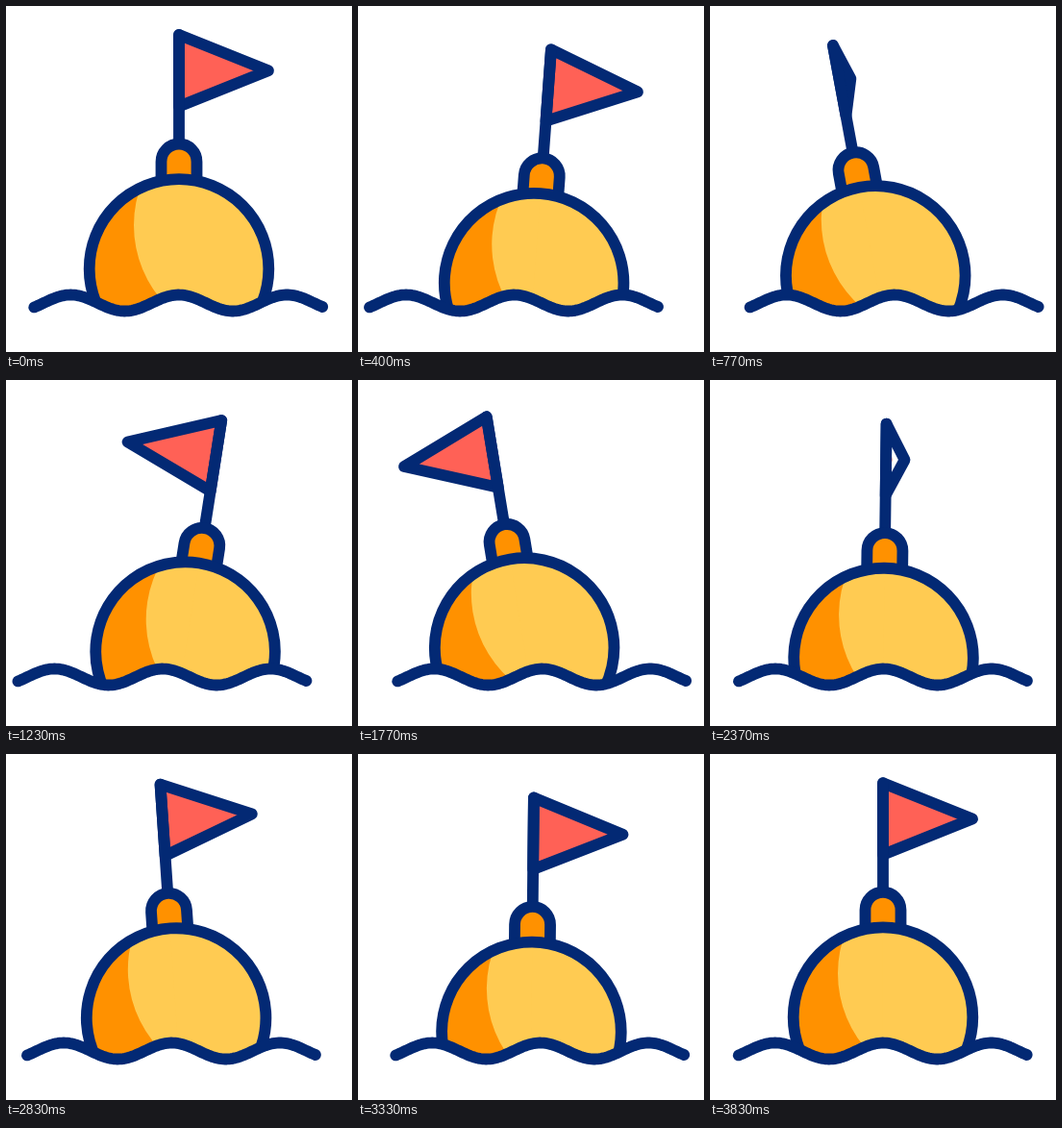
Animation, 360 px wide and 360 px high, one loop 3870 ms. Source, as an HTML page:

```html
<!DOCTYPE html>
<html lang="en">
<head>
<meta charset="utf-8">
<title>Buoy</title>
<style>
  html, body { margin: 0; width: 100%; height: 100%; overflow: hidden; background: #fff; }
  svg { display: block; width: 100vw; height: 100vh; }
  .line { stroke: #032974; stroke-width: 11.8; stroke-linecap: round; stroke-linejoin: round; }
</style>
</head>
<body>
<svg viewBox="0 0 360 360">
  <defs>
    <clipPath id="aboveWater"><path id="air"/></clipPath>
    <clipPath id="ball"><circle cx="180" cy="273.5" r="93.3"/></clipPath>
  </defs>
  <g clip-path="url(#aboveWater)">
    <g id="buoy">
      <path id="cloth" fill="#ff6156"/>
      <path id="flag" class="line" fill="none"/>
      <path class="line" fill="none" d="M180 30V143"/>
      <path class="line" fill="#ff9100" d="M161.5 184V162a18.5 18.5 0 0 1 37 0V184"/>
      <g clip-path="url(#ball)">
        <rect x="80" y="170" width="200" height="200" fill="#ff9100"/>
        <circle cx="253" cy="228" r="120" fill="#ffcb52"/>
        <rect x="180" y="170" width="100" height="200" fill="#ffcb52"/>
      </g>
      <circle class="line" cx="180" cy="273.5" r="93.3" fill="none"/>
    </g>
  </g>
  <path id="wave" class="line" fill="none"/>
</svg>
<script>
const LOOP = 3870;
const SWING = 958;   // one rock of the buoy
const BOB = 964;     // one dip of the buoy
const BOB_DELAY = 14;
const DRIFT = 433.3; // one sweep of the water
const [air, buoy, cloth, flag, wave] =
  ["air", "buoy", "cloth", "flag", "wave"].map(id => document.getElementById(id));

// cubic-bezier(.4, 0, .6, 1), solved by bisection
function ease(p) {
  let low = 0, high = 1, s = 0.5;
  for (let i = 0; i < 18; i++) {
    s = (low + high) / 2;
    const x = 1.2 * (1 - s) ** 2 * s + 1.8 * (1 - s) * s * s + s ** 3;
    if (x < p) low = s; else high = s;
  }
  return s * s * (3 - 2 * s);
}

function keyed(t, keys) {
  const next = keys.findIndex(([time]) => time > t);
  if (next < 0) return keys[keys.length - 1][1];
  if (next === 0) return keys[0][1];
  const [t0, v0] = keys[next - 1], [t1, v1] = keys[next];
  return v0 + (v1 - v0) * ease((t - t0) / (t1 - t0));
}

const driftKeys = [[-33, 0]];
const tiltKeys = [[0, 0]];
for (let i = 0; i < 8; i++) {
  driftKeys.push([(i + 1) * DRIFT - 33, i % 2 ? 13.5 : -17.5]);
  tiltKeys.push([(i + 0.5) * SWING / 2, i % 2 ? -11 : 9.1]);
}
driftKeys.push([LOOP, 0]);
tiltKeys.push([4 * SWING, 0]);
const flipKeys = [[494, 1], [1094, -1], [2033, -1], [2633, 1]];

function waterLine(from, to, shift) {
  const points = [];
  for (let x = from; x <= to; x += 2) {
    const y = 309 - 8.5 * Math.cos((x - 180) / 112.5 * 2 * Math.PI);
    points.push((x + shift).toFixed(2) + " " + y.toFixed(2));
  }
  return "M" + points.join("L");
}

const pennant = scale => `M180 30L${180 + 93 * scale} 67.3L180 104.5Z`;

function draw(t) {
  const shift = keyed(t, driftKeys);
  wave.setAttribute("d", waterLine(29.5, 330.5, shift));
  air.setAttribute("d", waterLine(-40, 400, shift) + "V-40H-60Z");

  const dip = Math.max(0, t - BOB_DELAY) / BOB;
  const bob = 8 * (1 - Math.cos(2 * Math.PI * dip));
  buoy.setAttribute("transform",
    `translate(0 ${bob}) rotate(${keyed(t, tiltKeys)} 180 316)`);

  const flip = keyed(t, flipKeys);
  flag.setAttribute("d", pennant(flip));
  // the cloth folds away behind the outline while the flag is edge-on
  cloth.setAttribute("d", pennant(Math.sign(flip) * Math.max(0, (Math.abs(flip) - 0.15) / 0.85)));
}

const start = performance.now();
function tick() {
  draw((performance.now() - start) % LOOP);
  requestAnimationFrame(tick);
}
tick();
</script>
</body>
</html>
```
